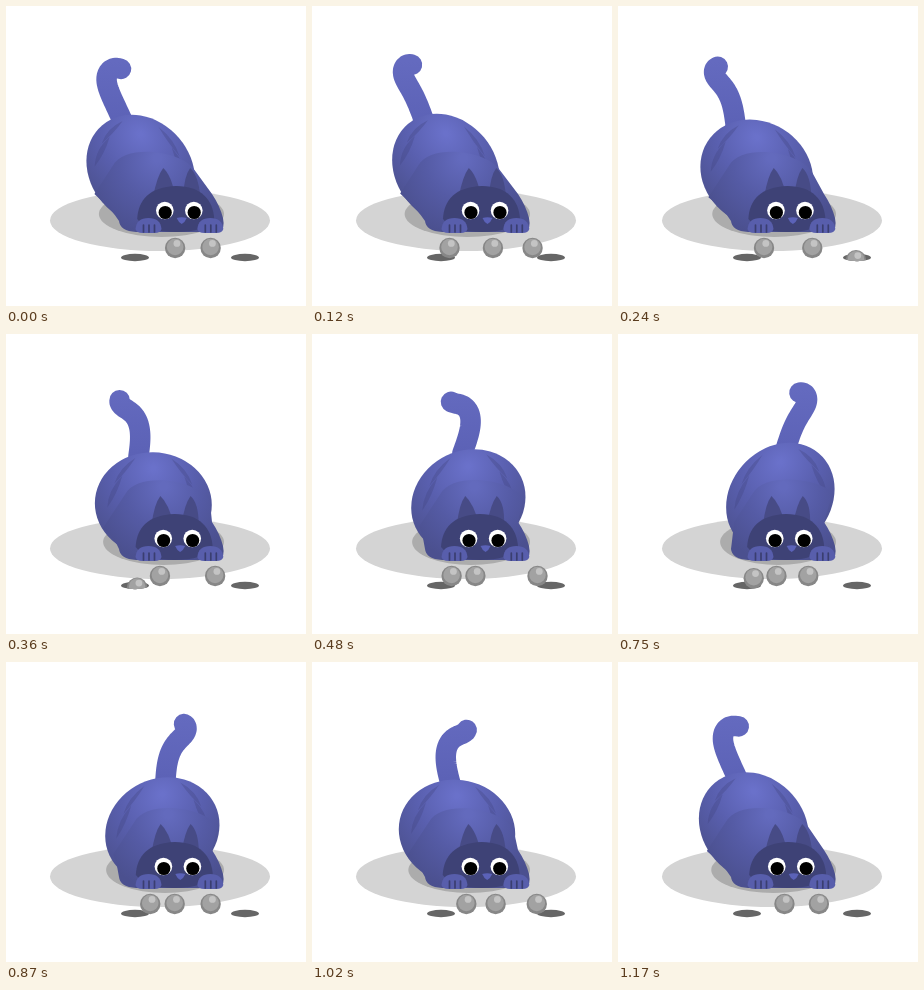
Write an HTML page with a canvas that moves like this. It is 300 px wide and 300 px high and loops after 1.2 s.

```html
<!DOCTYPE html>
<html lang="en">
<head>
<meta charset="utf-8">
<title>Cat watching balls</title>
<style>
html, body { margin: 0; width: 100%; height: 100%; overflow: hidden; background: #fff; }
canvas { display: block; width: 300px; height: 300px; }
</style>
</head>
<body>
<canvas width="300" height="300"></canvas>
<script>
const canvas = document.querySelector('canvas');
const ctx = canvas.getContext('2d');
const LOOP = 1200, STEP = 30, TAU = Math.PI * 2;
const HOLE_Y = 251.5, holes = [129, 239];
const ballDelays = [0, 330, 655];

// Cosine over one loop that peaks at the given time.
const wave = (t, peak) => Math.cos(TAU * (t - peak) / LOOP);

function ellipse(x, y, rx, ry, fill) {
  ctx.beginPath();
  ctx.ellipse(x, y, rx, ry, 0, 0, TAU);
  ctx.fillStyle = fill;
  ctx.fill();
}

function shape(d, fill) {
  ctx.fillStyle = fill;
  ctx.fill(new Path2D(d));
}

function gradient(g, ...stops) {
  stops.forEach((color, i) => g.addColorStop(i / (stops.length - 1), color));
  return g;
}

function bodyPose(t) {
  const sway = wave(t, 75), stretch = 2 * sway * sway - 1;
  return {
    x: 148.5 - 15 * sway,
    top: 112.7 - 5.5 * stretch,
    rx: 56 - 2.5 * stretch,
    ry: 53.5 + 1.5 * stretch,
    shear: 0.18 * sway
  };
}

// The tail bends in a wave that runs from its base to its tip.
function drawTail(t, top) {
  const length = 64, parts = 32;
  let x = 140 - 29 * wave(t, 110), y = top + 4;
  ctx.beginPath();
  ctx.moveTo(x, y + 8);
  ctx.lineTo(x, y);
  for (let i = 0; i < parts; i++) {
    const s = (i + 0.5) / parts;
    const bend = -(25 + 90 * s ** 4) * wave(t, 680 * s * s) * Math.PI / 180;
    x += Math.sin(bend) * length / parts;
    y -= Math.cos(bend) * length / parts;
    ctx.lineTo(x, y);
  }
  ctx.lineWidth = 20.5;
  ctx.lineCap = ctx.lineJoin = 'round';
  ctx.strokeStyle = gradient(ctx.createLinearGradient(0, 55, 0, 125), '#646abf', '#5b61b5');
  ctx.stroke();
}

function drawBody({ x, top, rx, ry, shear }) {
  const y = top + Math.hypot(ry, shear * rx);
  const left = x - rx, right = x + rx;

  ctx.save();
  ctx.transform(1, shear, 0, 1, x, y);
  ellipse(0, 0, rx, ry, gradient(ctx.createRadialGradient(0, -36, 2, 0, -30, 80),
    '#6a71ca', '#595fae', '#4c518f'));
  for (const side of [-1, 1]) {
    ctx.save();
    ctx.scale(side, 1);
    shape('M18 -46 Q34 -36 39 -20 Q27 -32 18 -46Z M31 -28 Q45 -14 46 4 Q36 -10 31 -28Z',
      'rgba(66, 70, 130, .35)');
    ctx.restore();
  }
  ctx.restore();

  // Chest and shoulders reach from the swaying hips to the fixed paws.
  const chest = x / 2 + 84;
  shape(`M${left + 8} ${y + 24} Q${left * .3 + 82} 204 113 215 Q114 225 130 226
    H214 Q219 222 217 212 Q214 200 206 188 L${right - 2} ${y - 4 + 10 * shear}
    C${right - 18} 144 ${x - 16} 138 ${x - 28} 160 Z`,
    gradient(ctx.createRadialGradient(chest, 152, 4, chest, 158, 72),
      '#636abd', '#555ba5', '#4b508f'));
}

function drawEye(x) {
  ellipse(x, 204.5, 8.8, 8.8, '#fff');
  ellipse(x + .4, 206.5, 6.6, 6.6, '#000');
}

function drawPaw(x) {
  shape(`M${x - 13} 223 Q${x - 12} 212 ${x} 212 Q${x + 12} 212 ${x + 13} 223
    Q${x + 12} 227 ${x + 6} 227 H${x - 6} Q${x - 12} 227 ${x - 13} 223Z`, '#585eac');
  ctx.strokeStyle = '#3a3e70';
  ctx.lineWidth = 1.7;
  ctx.beginPath();
  for (const dx of [-5, 0.5, 6]) {
    ctx.moveTo(x + dx, 219);
    ctx.lineTo(x + dx, 226);
  }
  ctx.stroke();
}

function drawHead(t) {
  const look = wave(t, 0);
  ctx.save();
  ctx.translate(1.2 * look, 0);
  const ears = [[155 + look, 146, 168], [184.5 - 1.5 * look, 176, 193]];
  for (const [tip, from, to] of ears) {
    shape(`M${from} 190 Q${tip - 6} 170 ${tip} 162 Q${tip + 8} 169 ${to} 190Z`, '#474b86');
  }
  shape(`M130 213 C131 194 142 181 169 180 C194 180 206 194 207 213
    Q198 226 169 226 Q140 226 130 213Z`, '#3e4276');
  drawEye(157.6);
  drawEye(186.6);
  shape('M169.5 212 Q174.5 210.5 179.5 212 Q178 216 174.5 218 Q171 216 169.5 212Z', '#5b62b8');
  ctx.restore();
  drawPaw(142.5);
  drawPaw(204.3);
}

function drawBall(age) {
  const depth = Math.max(0, 1 - age / 110, (age - 1030) / 105);
  if (depth >= 1) return;
  const roll = (age - 240) / 870;
  const x = age < 240 ? 129 + 17 * age / 240 : Math.min(239, 146 + 52 * roll + 40 * roll * roll);
  const y = 242 + 16 * depth;

  ctx.save();
  if (depth > 0.4) {
    const opening = new Path2D();
    opening.rect(0, 0, 300, HOLE_Y);
    for (const hole of holes) {
      opening.moveTo(hole + 14, HOLE_Y);
      opening.ellipse(hole, HOLE_Y, 14, 3.7, 0, 0, Math.PI);
    }
    ctx.clip(opening);
  }
  ellipse(x, y, 10.2, 10.2, '#878787');
  ellipse(x, y - 1, 8.3, 8.3, '#a2a2a2');
  ellipse(x + 1.8, y - 4.6, 3.4, 3.4, '#c4c4c4');
  ctx.restore();
}

function draw(t) {
  const pose = bodyPose(t);
  ctx.clearRect(0, 0, 300, 300);
  ellipse(154, 214.5, 110, 30.5, '#d4d4d4');
  const edge = 97.5 - 5 * wave(t, 75);
  ellipse((edge + 218) / 2, 208, (218 - edge) / 2, 23, '#acacac');
  drawTail(t, pose.top);
  drawBody(pose);
  drawHead(t);
  for (const x of holes) ellipse(x, HOLE_Y, 14, 3.7, '#666');
  for (const delay of ballDelays) drawBall((t - delay + LOOP) % LOOP);
}

const start = performance.now();
function tick() {
  const t = (performance.now() - start) % LOOP;
  draw(Math.floor(t / STEP) * STEP);
  requestAnimationFrame(tick);
}
tick();
</script>
</body>
</html>
```
